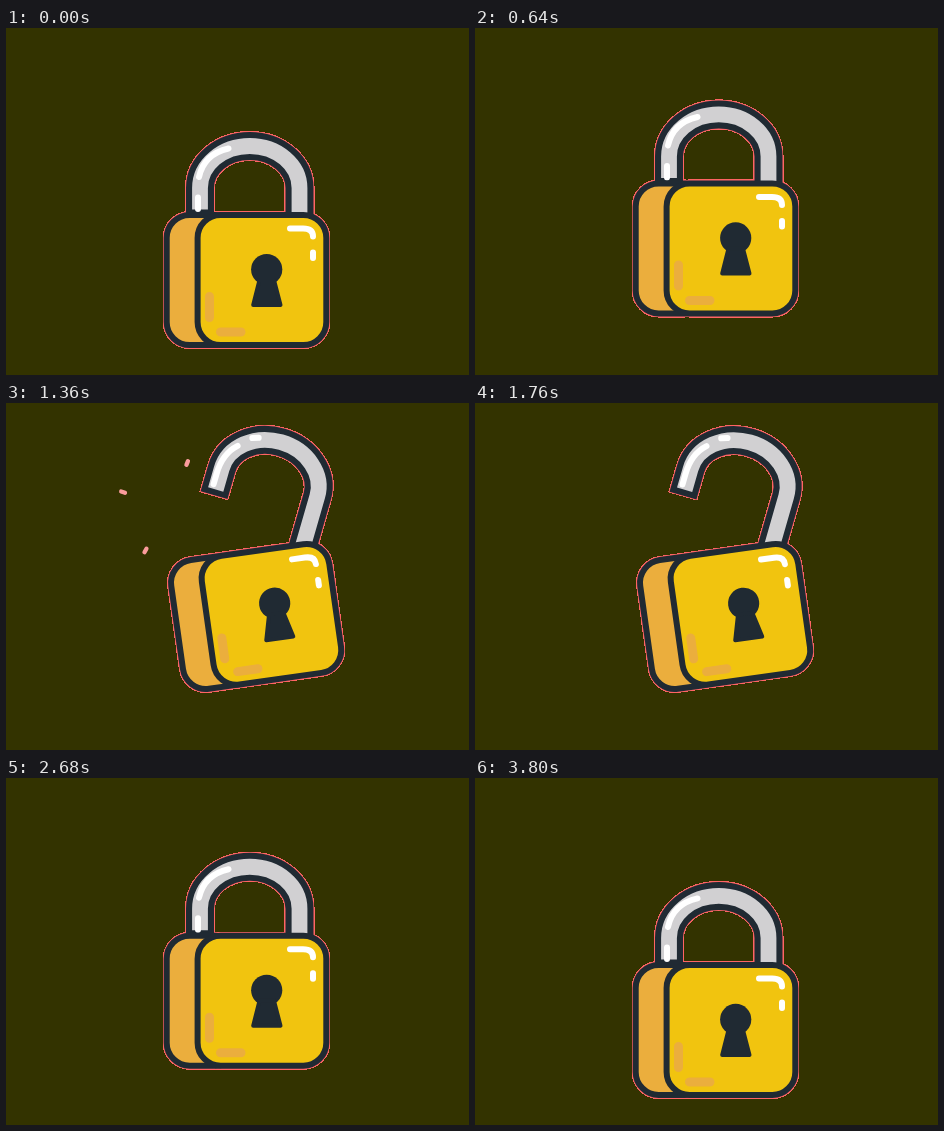
An HTML page for the animation above (3.84 s loop, 463 px wide and 347 px high).

```html
<!DOCTYPE html>
<html lang="en">
<head>
<meta charset="utf-8">
<title>Padlock</title>
<style>
  html, body { margin: 0; width: 100%; height: 100%; overflow: hidden; background: #330; }
  svg { display: block; width: 463px; height: 347px; }
  path, .rim { fill: none; }
  .dark { stroke: #202a33; stroke-width: 6; }
  .rim { stroke: #ff6464; shape-rendering: crispEdges; }
  .side { fill: #ebae3d; }
  .face { fill: #f1c40f; }
  .hole { fill: #202a33; stroke-width: 4; }
  .round { stroke-linecap: round; stroke-linejoin: round; }
  .shine { stroke: #fff; stroke-width: 6; }
  .amber { stroke: #ebae3d; stroke-width: 9; }
  .spark { stroke: #fb9c9c; stroke-width: 11; }
</style>
</head>
<body>
<svg viewBox="0 0 463 347">
  <defs>
    <rect id="back" x="160.700" y="187" width="72" height="130" rx="23"/>
    <rect id="front" x="191.600" y="187" width="128.700" height="130" rx="23"/>
    <path id="bow" d="M194 187.5V160A49.75 42 0 0 1 293.5 160V215"/>
  </defs>
  <g class="body rim" stroke-width="8.2"><use href="#back"/><use href="#front"/></g>
  <g class="shackle">
    <use href="#bow" class="rim" stroke-width="30.2" stroke-linecap="butt"/>
    <path class="rim" stroke-width="2" d="M179 187.5H209"/>
    <use href="#bow" style="stroke:#202a33;stroke-width:28"/>
    <path stroke="#d1d0d2" stroke-width="15.8" d="M194 181.5V160A49.75 42 0 0 1 293.5 160V215"/>
    <path id="shut" class="round shine" d="M193 149Q198 126 222.5 120.5M192 169.5V181"/>
    <path id="ajar" class="round shine" d="M190.500 177V166Q190.500 145 203 133.500M215 122L221 120"/>
  </g>
  <g class="body">
    <use href="#back" class="side dark"/>
    <use href="#front" class="face dark"/>
    <path class="round amber" d="M203.5 268.5V289.5M214.5 304H235"/>
    <path class="round shine" d="M284 200.5H297Q307 200.5 307 208.5M307 224.5V230"/>
    <circle cx="260.7" cy="241.5" r="15.6" fill="#202a33"/>
    <path class="round dark hole" d="M253.5 252H268L274.5 277H247.2Z"/>
  </g>
  <g id="sparks" class="round spark"><path/><path/><path/></g>
</svg>
<script>
const LOOP = 3840, STEP = 40;
const HUB = [163, 105];
const RAYS = [-161, -68, 119].map(a => a * Math.PI / 180);

const progress = (t, from, to) => Math.max(0, Math.min(1, (t - from) / (to - from)));

function smooth(t, from, to) {
  const u = progress(t, from, to);
  return u * u * (3 - 2 * u);
}

// Ease out with a small overshoot
function pop(t, from, to, k = 1.2) {
  const v = progress(t, from, to) - 1;
  return 1 + v * v * ((k + 1) * v + k);
}

const bodies = document.querySelectorAll('.body');
const shackle = document.querySelector('.shackle');
const shut = document.getElementById('shut');
const ajar = document.getElementById('ajar');
const sparks = document.getElementById('sparks');

function place(el, x, y, turn, cx, cy) {
  el.setAttribute('transform', `translate(${x} ${y}) rotate(${turn} ${cx} ${cy})`);
}

function drawSparks(t) {
  const u = progress(t, 800, 1420);
  sparks.style.display = u > 0 && u < 1 ? '' : 'none';
  const fade = Math.min(1, (1 - u) * 4);
  const far = 56 * u, near = far - Math.min(far, 10.5) * fade;
  sparks.style.strokeWidth = 11 * fade * Math.min(1, u * 5);
  RAYS.forEach((a, i) => {
    const at = r => `${HUB[0] + r * Math.cos(a)} ${HUB[1] + r * Math.sin(a)}`;
    sparks.children[i].setAttribute('d', `M${at(near)}L${at(far)}`);
  });
}

function draw(t) {
  const lift = 52 * (smooth(t, 0, 1120) - smooth(t, 1700, LOOP));
  const wind = smooth(t, 840, 1120) - smooth(t, 1120, 1280);
  const open = pop(t, 1120, 1640) * (1 - smooth(t, 1760, 2100));

  bodies.forEach(el =>
    place(el, 9.6 * open - 2 * wind, 13.4 * open - lift - wind, 2.1 * wind - 8 * open, 240.5, 252));
  place(shackle, 17.5 * open + 2 * wind, -28.6 * open - lift - wind, 2.1 * wind + 16 * open, 243.75, 167.7);

  const slide = smooth(open, 0.2, 0.8);
  shut.style.opacity = 1 - slide;
  ajar.style.opacity = slide;
  drawSparks(t);
}

const start = performance.now();
function tick() {
  const t = (performance.now() - start) % LOOP;
  draw(Math.floor(t / STEP) * STEP);
  requestAnimationFrame(tick);
}
tick();
</script>
</body>
</html>
```
